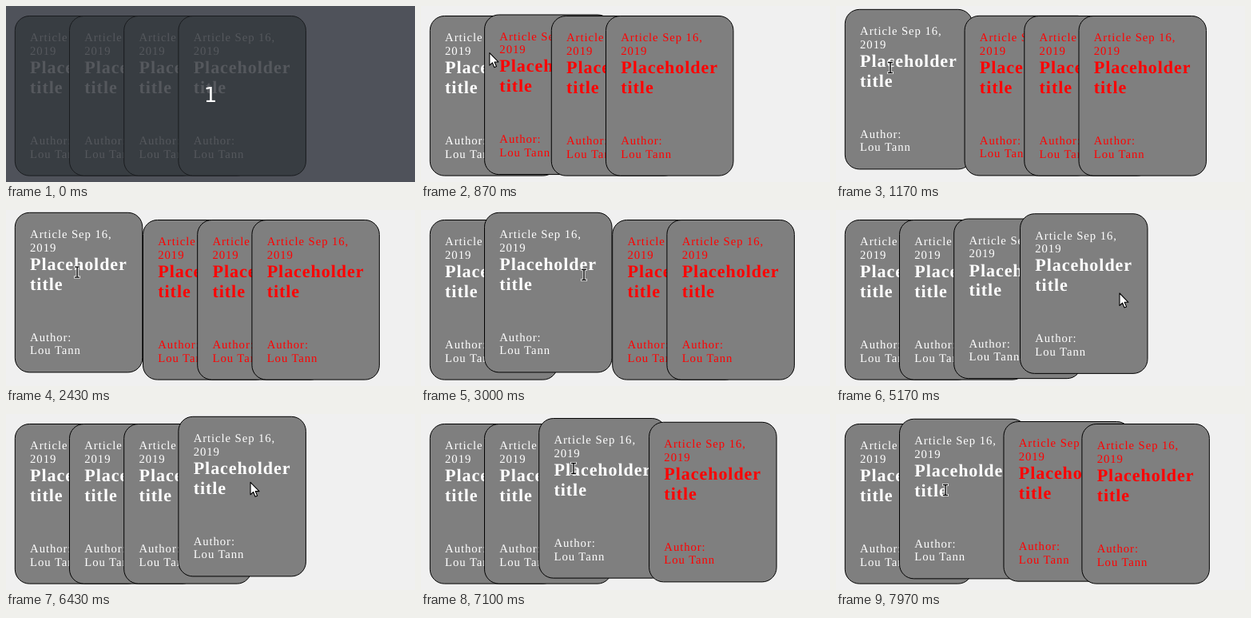
An HTML page for the animation above (8000 ms loop, 512 by 220 pixels).

```html
<!DOCTYPE html>
<html lang="en">
<head>
<meta charset="utf-8">
<title>Stacked cards</title>
<style>
  html, body { margin: 0; width: 100%; height: 100%; overflow: hidden; }
  svg { display: block; width: 512px; height: 220px; }
  text { text-rendering: geometricPrecision; }
  .card text {
    font: 14.72px "Liberation Serif", "Times New Roman", serif;
    letter-spacing: 0.92px;
  }
  .card .title { font-size: 22.08px; font-weight: bold; }
  #count { font: 26px "DejaVu Sans", sans-serif; fill: #fff; }
</style>
</head>
<body>
<svg viewBox="0 0 512 220">
  <rect id="back" width="512" height="220"/>
  <g id="deck"></g>
  <text id="count" x="256" y="120" text-anchor="middle">1</text>
  <g id="pointer">
    <path id="arrow" d="M0 0V15.5L3.6 12.2L6 18L8.6 16.9L6.2 11.3H11Z"
      fill="#fff" stroke="#000" stroke-width="1.1" stroke-linejoin="round"/>
    <g id="beam" fill="none" stroke-linecap="square">
      <path d="M-2.5 -6.5H2.5M0 -6.5V6.5M-2.5 6.5H2.5" stroke="#fff" stroke-width="3"/>
      <path d="M-2.5 -6.5H2.5M0 -6.5V6.5M-2.5 6.5H2.5" stroke="#000" stroke-width="1.4"/>
    </g>
  </g>
</svg>
<script>
const LOOP = 8000, INTRO = 30, SLIDE = 500, GLIDE = 200;
const LEFT = 11.3, TOP = 12.5, STEP = 68.2, WIDTH = 159.5, HEIGHT = 199.6;
const PUSH = 92, LIFT = -9.2, PAD = 18.8;

const BLOCKS = [
  { y: 44.3, leading: 16.56, lines: ["Article Sep 16,", "2019"] },
  { y: 84, leading: 24.84, lines: ["Placeholder", "title"], kind: "title" },
  { y: 173, leading: 16.56, lines: ["Author:", "Lou Tann"] }
];

// Each visit: when a card becomes hovered, and where the pointer comes to rest
const VISITS = [
  { time: 800, card: 1, x: 104, y: 40 },
  { time: 870, card: 0, x: 68, y: 77 },
  { time: 2500, card: 1, x: 204, y: 81 },
  { time: 3730, card: 2, x: 263, y: 98 },
  { time: 4900, card: 3, x: 355, y: 104 },
  { time: 6430, card: 3, x: 258, y: 67 },
  { time: 6872, card: 2, x: 191, y: 68 },
  { time: 7773, card: 1, x: 137, y: 95 }
];

const NS = "http://www.w3.org/2000/svg";
const byId = id => document.getElementById(id);
const show = (id, on) => byId(id).setAttribute("display", on ? "inline" : "none");
const mix = (a, b, k) => ({ x: a.x + (b.x - a.x) * k, y: a.y + (b.y - a.y) * k });
const clamp = v => Math.min(1, Math.max(0, v));

function add(parent, tag, attrs) {
  const node = document.createElementNS(NS, tag);
  for (const key in attrs) node.setAttribute(key, attrs[key]);
  return parent.appendChild(node);
}

// cubic-bezier(.25, .1, .25, 1)
function ease(p) {
  if (p <= 0 || p >= 1) return clamp(p);
  const curve = (a, b, u) => 3 * a * u * (1 - u) ** 2 + 3 * b * u * u * (1 - u) + u ** 3;
  let lo = 0, hi = 1;
  for (let i = 0; i < 24; i++) {
    const mid = (lo + hi) / 2;
    if (curve(0.25, 0.25, mid) < p) lo = mid; else hi = mid;
  }
  return curve(0.1, 1, lo);
}

function makeCard(i) {
  const x = LEFT + i * STEP;
  const group = add(byId("deck"), "g", { class: "card" });
  const box = add(group, "rect", { x, y: TOP, width: WIDTH, height: HEIGHT, rx: 18 });
  const words = add(group, "g", {});
  for (const { y, leading, lines, kind = "" } of BLOCKS) {
    lines.forEach((line, n) => {
      add(words, "text", { x: x + PAD, y: y + n * leading, class: kind }).textContent = line;
    });
  }
  return { group, box, words };
}

const cards = [0, 1, 2, 3].map(makeCard);

// Follows each change of target, starting from wherever the card was
function offset(i, t) {
  let from = { x: 0, y: 0 }, to = from, start = 0;
  const at = time => mix(from, to, ease((time - start) / SLIDE));
  for (const { time, card } of VISITS) {
    if (time > t) break;
    const next = { x: i > card ? PUSH : 0, y: i === card ? LIFT : 0 };
    if (next.x === to.x && next.y === to.y) continue;
    from = at(time);
    to = next;
    start = time;
  }
  return at(t);
}

// Glides to each resting place, halfway there as the hover changes
function pointerAt(t) {
  return VISITS.reduce((pos, stop) =>
    mix(pos, stop, clamp((t - stop.time) / GLIDE + 0.5)), VISITS[0]);
}

function inside(node, p, slack) {
  const b = node.getBBox();
  return p.x >= b.x && p.x <= b.x + b.width && p.y >= b.y && p.y <= b.y + b.height + slack;
}

function overText(pos, spots) {
  for (let i = cards.length - 1; i >= 0; i--) {
    const local = { x: pos.x - spots[i].x, y: pos.y - spots[i].y };
    if (!inside(cards[i].box, local, 0)) continue;
    return [...cards[i].words.children].some(line => inside(line, local, 2));
  }
  return false;
}

function draw(t) {
  const dim = t < INTRO;
  const past = VISITS.filter(v => v.time <= t);
  const hot = past.length ? past[past.length - 1].card : cards.length;
  byId("back").setAttribute("fill", dim ? "#4f525a" : "#f0f0f0");
  show("count", dim);

  const spots = cards.map(({ group, box, words }, i) => {
    const spot = offset(i, t);
    group.setAttribute("transform", `translate(${spot.x} ${spot.y})`);
    box.setAttribute("fill", dim ? "#383d42" : "#7f7f7f");
    box.setAttribute("stroke", dim ? "#1a1c1f" : "#000");
    words.setAttribute("fill", dim ? "#55585d" : i > hot ? "#f00" : "#fff");
    return spot;
  });

  show("pointer", past.length > 0);
  if (!past.length) return;
  const pos = pointerAt(t), text = overText(pos, spots);
  byId("pointer").setAttribute("transform", `translate(${pos.x} ${pos.y})`);
  show("beam", text);
  show("arrow", !text);
}

const begin = performance.now();
function tick() {
  draw((performance.now() - begin) % LOOP);
  requestAnimationFrame(tick);
}
tick();
</script>
</body>
</html>
```
